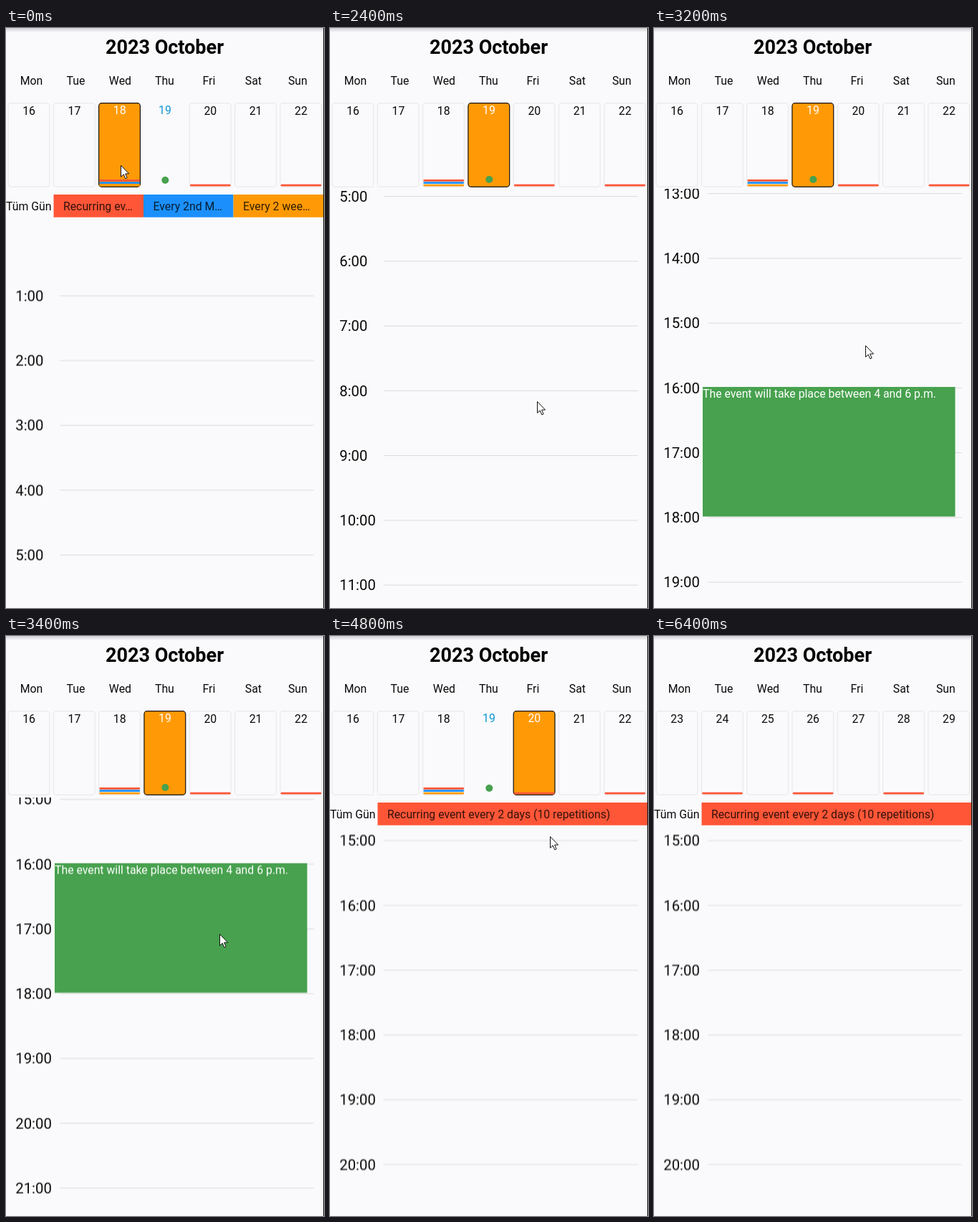
Animation of 444 by 808 pixels, one loop 7400 ms. Source, as an HTML page:

```html
<!DOCTYPE html>
<html lang="en">
<head>
<meta charset="utf-8">
<title>Calendar</title>
<style>
html, body { margin: 0; width: 100%; height: 100%; overflow: hidden; background: #fafafc; }
svg { display: block; width: 444px; height: 808px; font: 15.8px Roboto, sans-serif; }
.title { font-size: 27px; font-weight: 700; }
.hour { font-size: 20.3px; }
.mid { text-anchor: middle; }

.day0, .day1, .day2, .body, .scroll, .weeks, .cursor {
  animation: 7400ms step-end infinite;
}
.day0 { animation-name: day0; }
.day1 { animation-name: day1; }
.day2 { animation-name: day2; }
.body { animation-name: body; }
.scroll { animation-name: scroll; }
.weeks { animation-name: weeks; }
.cursor { animation-name: cursor; }

/* Selected day: Wed, Thu, Fri */
@keyframes day0 { 0% { opacity: 1 } 10.81%, 100% { opacity: 0 } }
@keyframes day1 { 0% { opacity: 0 } 10.81% { opacity: 1 } 59.45%, 100% { opacity: 0 } }
@keyframes day2 { 0% { opacity: 0 } 59.45%, 100% { opacity: 1 } }

/* The hours move down to make room for the all-day bar */
@keyframes body {
  0% { transform: translateY(45.5px) }
  10.81% { transform: translateY(0) }
  59.45%, 100% { transform: translateY(45.5px) }
}
@keyframes scroll {
  0% { transform: translateY(0) }
  29.72% { transform: translateY(-210px) }
  32.43% { transform: translateY(-454px) }
  35.13% { transform: translateY(-630px) }
  37.83% { transform: translateY(-806px) }
  40.54% { transform: translateY(-976px) }
  43.24% { transform: translateY(-1180px) }
  45.94% { transform: translateY(-1363.5px) }
  48.64%, 100% { transform: translateY(-1351.5px) }
}
@keyframes weeks {
  0% { transform: translateX(0) }
  72.97% { transform: translateX(-20px) }
  75.67% { transform: translateX(-85px) }
  78.37% { transform: translateX(-175px) }
  81.08% { transform: translateX(-330px) }
  83.78% { transform: translateX(-430px) }
  86.48%, 100% { transform: translateX(-443.1px) }
}
@keyframes cursor {
  0% { transform: translate(160px, 191px) }
  2.7% { transform: translate(168px, 189px) }
  5.4% { transform: translate(188px, 183px) }
  8.1% { transform: translate(208px, 177px) }
  10.81% { transform: translate(218px, 174px) }
  18.91% { transform: translate(224px, 200px) }
  21.62% { transform: translate(250px, 330px) }
  24.32% { transform: translate(280px, 540px) }
  27.02% { transform: translate(286px, 610px) }
  29.72% { transform: translate(288px, 565px) }
  32.43% { transform: translate(289px, 520px) }
  35.13% { transform: translate(290px, 502px) }
  37.83% { transform: translate(291px, 484px) }
  40.54% { transform: translate(292px, 467px) }
  43.24% { transform: translate(295px, 442px) }
  45.94% { transform: translate(298px, 415px) }
  51.35% { transform: translate(296px, 370px) }
  54.05% { transform: translate(292px, 280px) }
  56.75% { transform: translate(288px, 195px) }
  59.45% { transform: translate(286px, 170px) }
  62.16% { transform: translate(294px, 205px) }
  64.86% { transform: translate(307px, 279px) }
  67.56% { transform: translate(316px, 250px) }
  70.27% { transform: translate(318px, 190px) }
  72.97% { transform: translate(300px, 165px) }
  75.67% { transform: translate(235px, 160px) }
  78.37% { transform: translate(150px, 160px) }
  81.08% { transform: translate(60px, 160px) }
  83.78%, 100% { transform: translate(-40px, 160px) }
}
</style>
</head>
<body>
<svg id="stage" viewBox="0 0 444 808"></svg>
<script>
const RED = '#ff5637', BLUE = '#1b90fd', ORANGE = '#ff9a06', GREEN = '#47a14e';
const DAYS = ['Mon', 'Tue', 'Wed', 'Thu', 'Fri', 'Sat', 'Sun'];
const PITCH = 63.3, HOUR = 90.25, TODAY = 19;
const EVENTS = { 18: [RED, BLUE, ORANGE], 20: [RED], 22: [RED], 24: [RED], 26: [RED], 28: [RED] };

const text = (x, y, s, cls = '', fill = '#0a0a0a') =>
  `<text x="${x}" y="${y}" class="${cls}" fill="${fill}">${s}</text>`;
const rect = (x, y, w, h, fill, more = '') =>
  `<rect x="${x}" y="${y}" width="${w}" height="${h}" fill="${fill}" ${more}/>`;
const group = (cls, inner) => `<g class="${cls}">${inner}</g>`;
const hourY = h => 327.5 + (h - 1) * HOUR;

function cell(day, i, on) {
  const x = 3 + i * PITCH, mid = x + 29.1, today = day === TODAY;
  let out = '';
  if (on) out += rect(x, 104.7, 57.8, 116.6, ORANGE, 'rx="4" stroke="#15100a" stroke-width="1.2"');
  else if (!today) out += rect(x, 104.7, 57.8, 116.6, 'none', 'rx="4" stroke="#e9e9eb" stroke-width="1.2"');
  const raised = on || today;
  out += text(mid, raised ? 119.6 : 120.5, day, 'mid', on ? '#fff' : today ? '#0d96d6' : undefined);
  if (today) out += `<circle cx="${mid + .3}" cy="${on ? 211 : 212}" r="5" fill="${GREEN}"/>`;
  const marks = EVENTS[day] || [];
  marks.forEach((c, k) => {
    out += rect(x + .8, 217.7 - (marks.length - 1 - k) * 3.4, 56.6, 2.8, c, 'rx="1"');
  });
  return out;
}

const week = (first, sel) => DAYS.map((_, i) => cell(first + i, i, first + i === sel)).join('');

function allDay(labels) {
  const w = 376.5 / labels.length;
  return text(0, 253.5, 'Tüm Gün') + labels.map(([s, c], i) =>
    rect(66.5 + i * w, 232, w, 31.7, c) + text(80 + i * w, 253.5, s, '', 'rgba(0,0,0,.8)')).join('');
}

function hours() {
  let out = '';
  for (let h = 1; h < 24; h++) {
    const y = hourY(h);
    out += rect(75, y - .5, 355, 1.2, '#dfdfe1') + text(13.3, y + 7.4, h + ':00', 'hour');
  }
  const y = hourY(16);
  return out + group('day1', rect(68, y - 1.2, 352.5, 2 * HOUR, GREEN) +
    text(68, y + 13.7, 'The event will take place between 4 and 6 p.m.', '', '#fff'));
}

document.getElementById('stage').innerHTML = `
  <defs>
    <linearGradient id="shade" x2="0" y2="1">
      <stop stop-color="#cfcfd1"/><stop offset="1" stop-color="#fafafc"/>
    </linearGradient>
    <clipPath id="view"><rect y="224.5" width="444" height="640"/></clipPath>
  </defs>` +
  rect(0, 0, 444, 808, '#fafafc') +
  rect(0, 0, 444, 6, 'url(#shade)') +
  text(221.5, 35.8, '2023 October', 'title mid', '#000') +
  DAYS.map((d, i) => text(35.4 + i * 62, 78.7, d, 'mid')).join('') +
  `<g class="body"><g clip-path="url(#view)">${group('scroll', hours())}</g></g>` +
  group('weeks',
    [18, 19, 20].map((d, i) => group('day' + i, week(16, d))).join('') +
    `<g transform="translate(443.1 0)">${week(23)}</g>`) +
  group('day0', allDay([['Recurring ev…', RED], ['Every 2nd M…', BLUE], ['Every 2 wee…', ORANGE]])) +
  group('day2', allDay([['Recurring event every 2 days (10 repetitions)', RED]])) +
  rect(443, 0, 1, 808, '#161616') +
  group('cursor', '<path d="M.5.5V16.3L4.2 12.9L6.8 18.8L9.1 17.8L6.6 12H11.6Z" fill="#fff" stroke="#111"/>');
</script>
</body>
</html>
```
